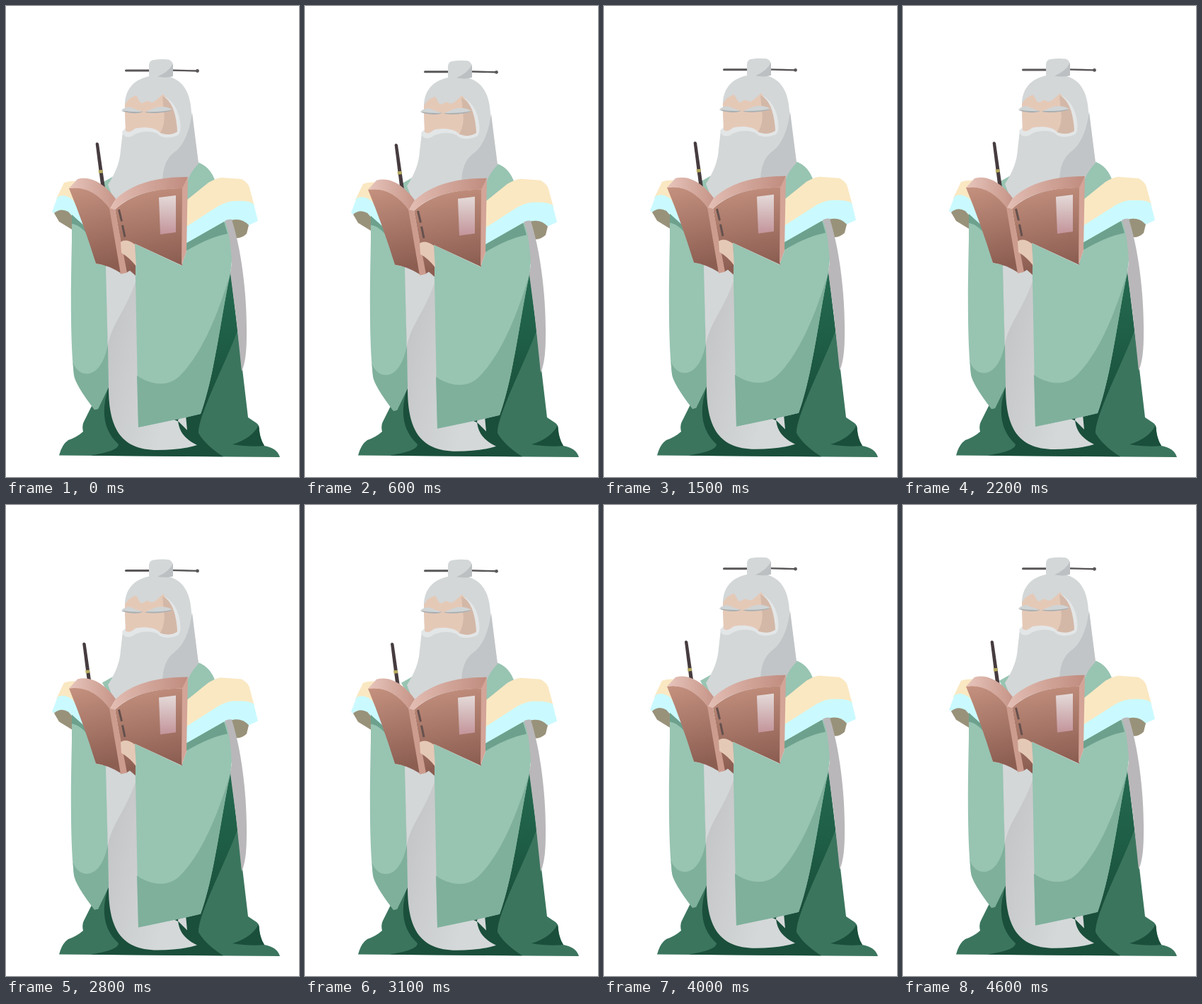
An HTML page that plays this animation: 414 by 664 pixels, repeating every 4.9 s.

```html
<!DOCTYPE html>
<html lang="en">
<head>
<meta charset="utf-8">
<title>Reading sage</title>
<style>
  html, body { margin: 0; width: 100%; height: 100%; overflow: hidden; background: #fff; }
  svg { display: block; width: 100%; height: 100%; }
</style>
</head>
<body>
<svg viewBox="0 0 414 664">
  <defs>
    <linearGradient id="cover" x1="0" y1="0" x2="0.15" y2="1">
      <stop offset="0" stop-color="#c5917f"/><stop offset="1" stop-color="#8c5e52"/>
    </linearGradient>
    <linearGradient id="pages">
      <stop offset="0" stop-color="#e7c5bc"/><stop offset="1" stop-color="#c79588"/>
    </linearGradient>
    <linearGradient id="pagesRight">
      <stop offset="0" stop-color="#e3bdb3"/><stop offset="1" stop-color="#c08c7f"/>
    </linearGradient>
    <linearGradient id="label" x1="0" y1="0" x2="0" y2="1">
      <stop offset="0" stop-color="#e4dad8"/><stop offset="1" stop-color="#c3949a"/>
    </linearGradient>
    <linearGradient id="lining" x1="0" y1="0" x2="0" y2="1">
      <stop offset="0" stop-color="#256b51"/><stop offset=".35" stop-color="#1f5f47"/><stop offset=".75" stop-color="#1a4f3b"/>
    </linearGradient>
    <linearGradient id="gown" x1="0" y1="0" x2="1" y2=".5">
      <stop offset=".2" stop-color="#c5c6c7"/><stop offset=".85" stop-color="#d4d8d9"/>
    </linearGradient>
  </defs>

  <g id="skirt">
    <path fill="#3b755e" d="M145 530L121 564L110 586Q107 591 109 600Q100 608 88 612Q79 618 75 633.500L387 636Q383 623 365 620Q359 611 358 598Q358 591 354 588L342 580L334 512L317 375Z"/>
    <path fill="url(#lining)" d="M300 372H317L327 458C312 500 272 575 272 602C279 615 294 627 307 635.300L120 633.800C131 631 158 628 159 618C137 598 134 570 145 537L250 520Z"/>
    <path fill="#1a4f3b" d="M320 618Q347 610 357 591Q358 609 365 620Q345 622 320 618Z"/>
  </g>

  <g id="body">
    <g id="gownFront">
      <path fill="url(#gown)" d="M140 355L145 537C145 592 160 626 214 626Q248 626 270 619C260 614 244 605 243 583L254 577L256 598L244 586L187 560V355Z"/>
      <path fill="#d3d7d8" d="M140 355H187V378C170 430 151 445 144 477Z"/>
    </g>

    <g id="shoulders" fill="#98c4b2">
      <path d="M270 220Q289 226 296 248L250 290V240Z"/>
      <path d="M152 240L136 249L150 275Z"/>
    </g>

    <g id="head">
      <path fill="none" stroke="#5a5759" stroke-width="3" stroke-linecap="round" d="M169.500 91H206"/>
      <path fill="none" stroke="#5a5759" stroke-width="2.4" d="M230 90.500L270 91.500"/>
      <circle cx="270.5" cy="91.5" r="2.4" fill="#5a5759"/>
      <path fill="#d3d7d8" d="M168 140C168 116 183 98 216 98C245 98 260 115 262 150L272 222Q258 235 257 245L155 280L144 252C155 235 161 220 162 203L165 177L169 172Z"/>
      <path fill="#c2c5c7" d="M263 150C259 180 250 197 238 206Q221 218 221 250L257 245Q261 234 272 222Z"/>
      <path fill="#e3e6e7" d="M164 177C166 187 176 186 182 181C192 176 206 176 214 180C220 187 233 187 243 182C249 177 246 162 244 154Q240 139 228 130L220 125V170L170 171Z"/>
      <path fill="#e5c9b7" d="M168 150L168 139Q173 129 184 126L189 135Q191 138 195 136Q199 132 203 135Q208 137 212 133L222 124L227 131Q240 143 242 177Q232 184 218 179C212 170 190 170 182 173Q174 180 169 176Z"/>
      <path fill="#d3b8a8" d="M221 127L227 131Q240 143 242 177Q232 184 218 179Q226 164 223 148Z"/>
      <path fill="#a9aeb0" d="M163 148Q178 144 194 149Q184 154 163 148ZM196 150Q214 142 235 147Q215 153 196 150Z"/>
      <path fill="#d0d4d5" d="M163 147Q172 139 181 145L193 149Q178 150 163 147ZM197 149L212 143Q224 140 235 146Q218 150 197 149Z"/>
      <path fill="#d3d7d8" d="M202 83Q203 76 209 76Q219 74.300 230 75.500Q236 78 236 84V99Q219 102 202 101Z"/>
      <path fill="#bcc0c2" d="M236 81Q230 93 214 99.500Q227 102 236 99Z"/>
    </g>

    <g id="brush">
      <path fill="#463c3f" d="M126.600 194Q128.500 190.500 131 194L140.500 260H135Z"/>
      <path fill="#b5a95e" d="M130.600 231.500L136.300 231L136.900 235.200L131.200 236Z"/>
    </g>

    <g id="leftSleeve">
      <path fill="#fae8c2" d="M82 249Q90 246 102 247L120 310L71 272Z"/>
      <path fill="#cafaff" d="M73 269Q84 264 95 274L120 320L92 300L76 290L68 292L65 290Z"/>
      <path fill="#99927a" d="M68 292Q77 284 88 290L95 298L93 315L75 304Z"/>
      <path fill="#98c4b2" d="M93 295L115 317L127 363L141 366L145 537L130 568L125 569Q98 534 96 520C90 470 92 380 93 330Z"/>
      <path fill="#7fb09c" d="M94.500 502C102 525 134 530 144 477L145 537L130 568L125 569Q98 534 96 520Z"/>
      <path fill="#6da18d" d="M93 294L114 313L117 324Q104 308 93 307Z"/>
    </g>

    <g id="rightSleeve">
      <path fill="#fae8c2" d="M250 278L286 249Q300 241 306 242L333 244Q343 250 344 256L351 282L310 284L250 318Z"/>
      <path fill="#cafaff" d="M250 314L300 282Q315 274 325 275Q342 274 350 279L356 303L343 309L319 303L308 304L250 340Z"/>
      <path fill="#99927a" d="M318 302Q333 298 343 309L340 321Q333 328 324 327Z"/>
      <path fill="#98c4b2" d="M182 335L248 366L256 343L310 303L322 335L317 377C305 430 295 520 275 575L254 580L187 594Z"/>
      <path fill="#6da18d" d="M250 337L308 304L313 321Q286 326 250 348Z"/>
      <path fill="#7fb09c" d="M185 521C207 536 231 537 247 520C280 486 301 429 317 377C305 430 295 520 275 575L254 580L187 594Z"/>
      <path fill="#b9b7b9" d="M309 303Q314 300 319 301C333 345 341 410 340 465Q340 500 333 515L325 438L317 377L319 362Q317 320 309 303Z"/>
    </g>

    <g id="book">
      <path fill="#8c5e52" d="M158 335L170 376L175 373L183 380V355Z"/>
      <path fill="url(#cover)" d="M154 287C180 263 215 257 250 257L249 366L182 335L183 365L170 376Z"/>
      <path fill="url(#cover)" d="M89 257Q125 252 147 286L163 377Q144 365 127 363Q110 308 89 257Z"/>
      <path fill="url(#pages)" d="M89 257L101 244C123 238 144 256 155 272L147 286C130 264 112 254 89 257Z"/>
      <path fill="url(#pagesRight)" d="M147 286L155 272C180 249 215 241 257 241L250 257C210 258 177 264 154 287Z"/>
      <path fill="#cc9c8e" d="M146 285L154 287L171 376L162 378Z"/>
      <path fill="#d3a497" d="M257 241L249 257L248 366L255 346Z"/>
      <path fill="url(#label)" d="M216 270L240 267V319L218 322Z"/>
      <path fill="none" stroke="#65514e" stroke-width="3" d="M159.500 287L163.500 303.500M164.500 309L168 325.500"/>
      <path fill="#e5c9b7" d="M162 333Q169 327 182 336L184 367Q175 355 163 348Z"/>
    </g>
  </g>
</svg>
<script>
  const LOOP = 4900;
  const BREATH = { height: 1.8, period: LOOP / 2 };
  const BRUSH_KEYS = [[0, 0], [2250, 0], [2750, -19], [3150, -5], [3850, -15], [4300, -6], [LOOP, 0]];
  const body = document.getElementById('body');
  const brush = document.getElementById('brush');

  const smooth = u => u * u * (3 - 2 * u);

  // Poses are held for 300 ms, except for one 400 ms hold at 1500.
  function heldTime(t) {
    return t < 1900
      ? Math.min(1500, Math.floor(t / 300) * 300)
      : 1900 + Math.floor((t - 1900) / 300) * 300;
  }

  function keyed(keys, t) {
    const i = keys.findIndex(([time]) => time > t);
    const [t0, v0] = keys[i - 1], [t1, v1] = keys[i];
    return v0 + (v1 - v0) * smooth((t - t0) / (t1 - t0));
  }

  function draw(t) {
    const lift = BREATH.height * Math.sin(2 * Math.PI * t / BREATH.period);
    body.setAttribute('transform', `translate(0 ${lift})`);
    brush.setAttribute('transform', `translate(${keyed(BRUSH_KEYS, t)} 0)`);
  }

  const start = performance.now();
  function tick() {
    draw(heldTime((performance.now() - start) % LOOP));
    requestAnimationFrame(tick);
  }
  tick();
</script>
</body>
</html>
```
